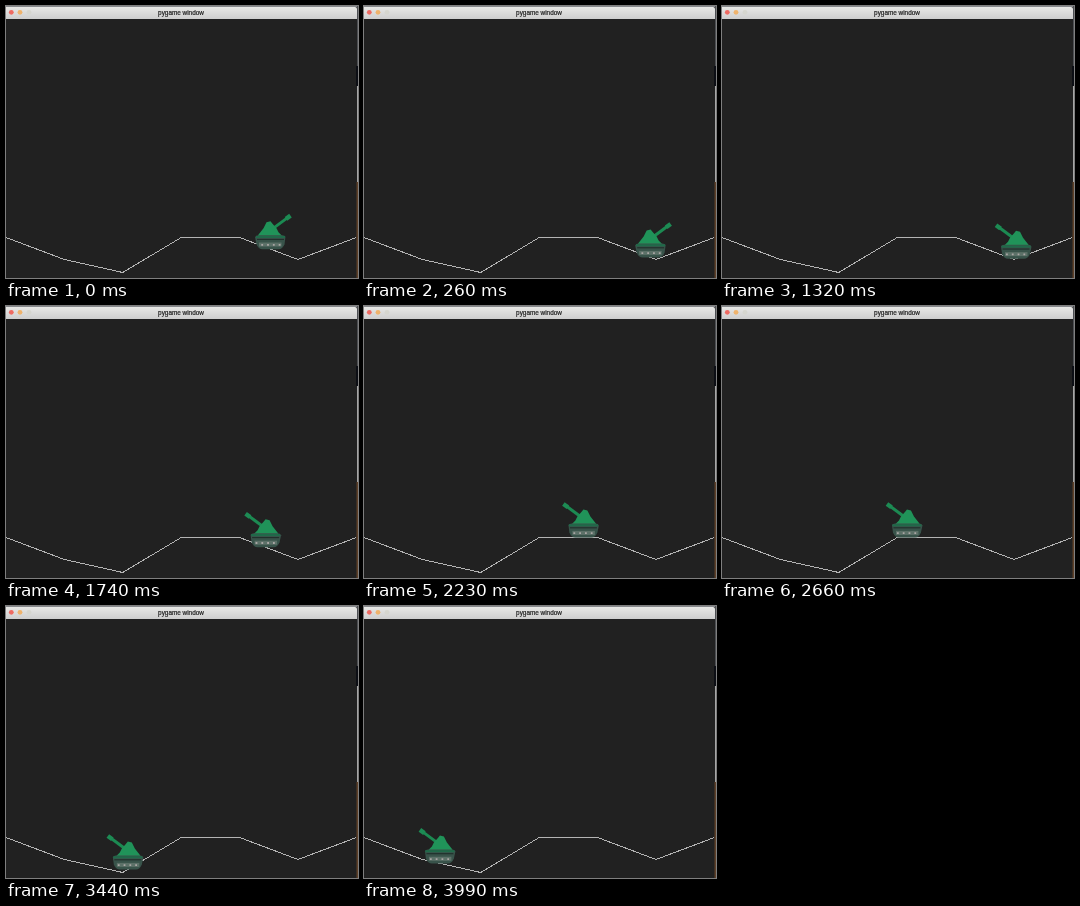
Recreate the animation shown at these times as an HTML page. Size 352 by 272 pixels, loop 4060 ms.

```html
<!DOCTYPE html>
<html lang="en">
<head>
<meta charset="utf-8">
<title>pygame window</title>
<style>
  html, body { margin: 0; width: 100%; height: 100%; overflow: hidden; background: #212121; }
  svg { display: block; width: 100%; height: 100%; }
  text { font: 6.4px "Liberation Sans", sans-serif; fill: #222; stroke: #222; stroke-width: .2; text-anchor: middle; }
</style>
</head>
<body>
<svg viewBox="0 0 352 272">
  <defs>
    <linearGradient id="bar" x2="0" y2="1">
      <stop stop-color="#e8e8e6"/>
      <stop offset="1" stop-color="#cecece"/>
    </linearGradient>
  </defs>

  <rect width="352" height="272" fill="#212121"/>
  <!-- Desktop showing past the window's right edge -->
  <rect x="351" width="1" height="60" fill="#4c4e52"/>
  <rect x="350" y="60" width="2" height="20" fill="#0c0e14"/>
  <rect x="351" y="80" width="1" height="96" fill="#a5a5a5"/>
  <rect x="350.5" y="176" width="1.5" height="96" fill="#5e4028"/>

  <rect width="351" height="1" fill="#86888c"/>
  <path d="M0 13V1H349Q351 1 351 3V13Z" fill="url(#bar)"/>
  <circle cx="5.3" cy="6.3" r="2.4" fill="#ee6a62"/>
  <circle cx="14" cy="6.3" r="2.4" fill="#efb36c"/>
  <circle cx="23" cy="6.3" r="2.4" fill="#d6d6cf"/>
  <text x="175" y="8.6">pygame window</text>

  <polyline id="ground" fill="none" stroke="#b4b4b4" shape-rendering="crispEdges"/>

  <!-- Faces left; origin is the middle of the tracks' lower edge -->
  <g id="tank">
    <path d="M-18.5 -32.5L-3 -21" stroke="#1c8a52" stroke-width="3"/>
    <path d="M-20 -33.5L-15.5 -30.3" stroke="#1d8b54" stroke-width="4.4"/>
    <path d="M-12 -13L-8 -17L-6 -21L-2 -25.5L0 -28L4 -27L7 -21L12.5 -14V-12H-12Z" fill="#209359"/>
    <path d="M-15 -12.5Q-14 -14 -12 -14H12Q15 -14 15.5 -12L14 -5Q12 0 8 0H-8Q-12 0 -14 -5Z" fill="#38534a"/>
    <path d="M-14.5 -12.2H14.5" stroke="#1f6a49" stroke-width="2"/>
    <path d="M-13.5 -9.7H13.5" stroke="#22302c" stroke-width="1.2"/>
    <path d="M-11 -4.6H11.5" stroke="#5c7168" stroke-width="4"/>
    <path d="M-10 -4.3H11" stroke="#a9a6a4" stroke-width="1.8" stroke-dasharray="1.8 4"/>
  </g>
</svg>
<script>
const LOOP = 4060;
const TICK = 70;
const PHASE = 50;
const STOP = 780;
const TURN = 900;
const SPEED = 0.082; // px per ms
const SPACING = 58.4;
const heights = [231.5, 253.5, 266.5, 231.5, 231.5, 253.5, 231.5];

const tank = document.getElementById("tank");
document.getElementById("ground").setAttribute("points",
  heights.map((y, i) => `${i * SPACING},${y}`).join(" "));

function groundAt(x) {
  const i = Math.floor(x / SPACING);
  return heights[i] + (heights[i + 1] - heights[i]) * (x / SPACING - i);
}

// The tank drives right, pauses, then turns and drives left.
function draw(now) {
  const step = Math.floor((now % LOOP - PHASE) / TICK);
  const time = Math.max(0, step * TICK + PHASE + 10);
  const x = 264.5 + SPEED * (Math.min(time, STOP) - Math.max(0, time - TURN));
  const facing = time < TURN ? -1 : 1;
  tank.setAttribute("transform", `translate(${x} ${groundAt(x)}) scale(${facing} 1)`);
}

const start = performance.now();
function tick() {
  draw(performance.now() - start);
  requestAnimationFrame(tick);
}
tick();
</script>
</body>
</html>
```
